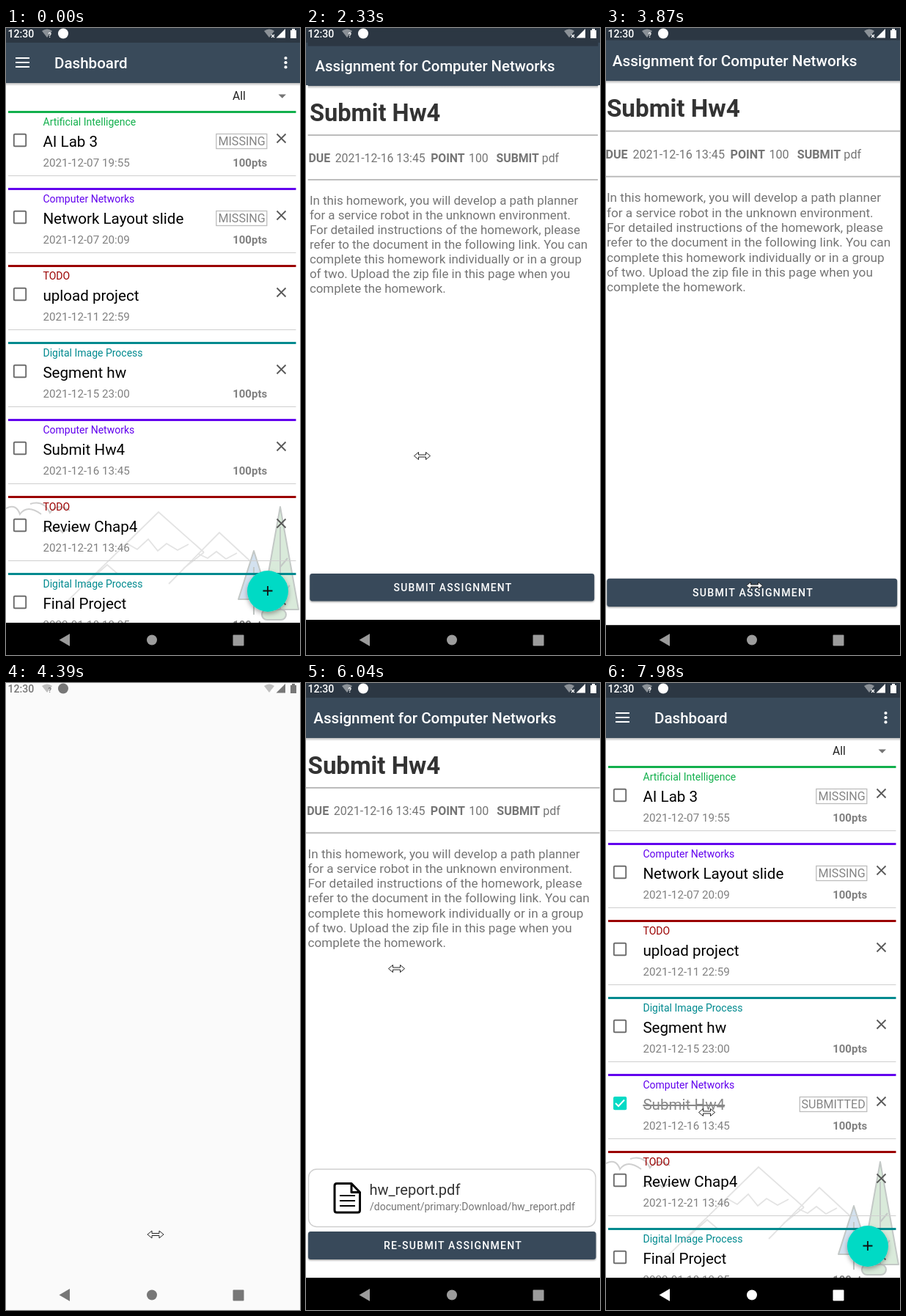
Write an HTML page that moves like this. It is 401x855 px and loops after 8 s.

```html
<!DOCTYPE html>
<html lang="en">
<head>
<meta charset="utf-8">
<title>Homework planner</title>
<style>
html, body { margin: 0; width: 100%; height: 100%; overflow: hidden; background: #000; }
svg { display: block; width: 401px; height: 855px; font-family: Roboto, sans-serif; }
text { white-space: pre; }
</style>
</head>
<body>
<svg id="stage" viewBox="0 0 401 855"></svg>
<script>
const LOOP = 8000, CX = 200, CY = 414;
const BAR = '#394a5a', GREY = '#757575', TEAL = '#03dac5';

const text = (x, y, s, size, fill, extra = '') =>
  `<text x="${x}" y="${y}" font-size="${size}" fill="${fill}" ${extra}>${s}</text>`;
const rect = (x, y, w, h, fill, extra = '') =>
  `<rect x="${x}" y="${y}" width="${w}" height="${h}" fill="${fill}" ${extra}/>`;
const line = (d, stroke, width, extra = '') =>
  `<path d="${d}" fill="none" stroke="${stroke}" stroke-width="${width}" ${extra}/>`;
const bold = 'font-weight="700"', medium = 'font-weight="500"';

const appBar = (x, title) =>
  rect(0, 74, 401, 737, '#fff') + rect(0, 75, 401, 4, 'url(#drop)') +
  rect(0, 10, 401, 65, BAR) + rect(0, 0, 401, 20, '#2c3743') +
  text(x, 55.3, title, 20.55, '#fff', medium);

// Dashboard
const subjects = {
  'Artificial Intelligence': '#12b04c',
  'Computer Networks': '#6200ee',
  'TODO': '#9b0000',
  'Digital Image Process': '#008a8f'
};
const [AI, NET, TODO, IMG] = Object.keys(subjects);
const tasks = [
  [AI, 'AI Lab 3', '2021-12-07 19:55', 1, 'MISSING'],
  [NET, 'Network Layout slide', '2021-12-07 20:09', 1, 'MISSING'],
  [TODO, 'upload project', '2021-12-11 22:59', 0],
  [IMG, 'Segment hw', '2021-12-15 23:00', 1],
  [NET, 'Submit Hw4', '2021-12-16 13:45', 1],
  [TODO, 'Review Chap4', '2021-12-21 13:46', 0],
  [IMG, 'Final Project', '2022-01-18 13:35', 1]
];

const badge = (s, w) =>
  rect(355.8 - w, 31.5, w, 20, 'none', 'stroke="#bdbdbd" stroke-width="1.3"') +
  text(353.8, 47.3, s, 16.1, '#858585', 'text-anchor="end"');

const openBox = rect(10.8, 31.8, 16.4, 16.4, 'none', 'rx="1.5" stroke="#707070" stroke-width="2"');
const checkedBox = rect(10, 31, 18.2, 18.2, TEAL, 'rx="2"') +
  line('M13 40l4 4 8-8.5', '#fff', 2);

function row([subject, title, due, points, status], i) {
  const color = subjects[subject];
  const plain = openBox + text(50.4, 49.3, title, 20.6, '#000');
  const head = i === 4
    ? `<g id="todo">${plain}</g><g id="done">${checkedBox}` +
      text(50.4, 49.3, title, 20.6, '#888', 'text-decoration="line-through"') + badge('SUBMITTED', 91.5) + '</g>'
    : plain;
  return `<g transform="translate(0 ${113 + i * 105})">` + rect(3, 0, 392.5, 3, color) +
    text(50.5, 20, subject, 14, color) + head + text(50.5, 75.5, due, 15.2, '#808080') +
    (points ? text(356.2, 75.5, '100pts', 15, '#808080', bold + ' text-anchor="end"') : '') +
    (status ? badge(status, 69) : '') +
    line('M369.5 31.5l12 12m0-12l-12 12', '#5a5a5a', 1.8) +
    rect(3, 88, 392.5, 1, '#cfcfcf') + '</g>';
}

const scenery =
  line('M0 655q14-7 19 8q10-14 29 0M33 649q18-6 27 12q10-14 27-3M50 687q20-10 27 1q10-8 22-3', '#cfcfcf', 2) +
  line('M75 790L208 660 270 715M222 758L291 688 345 738M165 703l14 8 15-14 13 16 12-10 15 9 15-8M262 717l13 6 12-9 13 10 15-8M102 764l36-32 14 12M270 715l-28 22',
    '#e3e3e3', 1.8) +
  '<g stroke="#c3c8c6" stroke-width="2" stroke-linejoin="round">' +
  '<path d="M349 793L374 653 399 793Z" fill="#d9eada"/><path d="M317 779L338 713 359 779Z" fill="#d3e1ef"/>' +
  '<path d="M374 680V806M374 735l10-12M374 760l-12-14M374 775l13-15M338 735V800M338 760l8-9" fill="none"/>' +
  '<rect x="349" y="793" width="33" height="14" rx="7" fill="#d9eada"/></g>';

const dashboard = '<g id="dash" clip-path="url(#page)">' + appBar(66, 'Dashboard') +
  line('M13 41h19M13 47h19M13 53h19', '#fff', 2) +
  [41, 47.2, 53.4].map(y => `<circle cx="381.5" cy="${y}" r="2.1" fill="#fff"/>`).join('') +
  text(309, 98, 'All', 15.6, '#222') + '<path d="M371.5 90.5h10.5l-5.2 5.2z" fill="#757575"/>' +
  scenery + tasks.map(row).join('') +
  `<circle cx="357" cy="768" r="28" fill="${TEAL}" filter="url(#lift)"/>` +
  line('M350.5 767.5h13M357 761v13', '#111', 1.8) + '</g>';

// Assignment
const body = [
  'In this homework, you will develop a path planner',
  'for a service robot in the unknown environment.',
  'For detailed instructions of the homework, please',
  'refer to the document in the following link. You can',
  'complete this homework individually or in a group',
  'of two. Upload the zip file in this page when you',
  'complete the homework.'
];
const facts = [
  [1.2, 'DUE', bold], [37.8, '2021-12-16 13:45'], [169.8, 'POINT', bold],
  [222.3, '100'], [260.3, 'SUBMIT', bold], [323.3, 'pdf']
];
const fileCard = '<g id="card">' +
  rect(3.5, 663, 391.5, 78.5, '#fff', 'rx="11" stroke="#cfcfcf" stroke-width="1.3"') +
  line('M42 682.5h20l11.5 12V719q0 3-3 3H42q-3 0-3-3V685.5q0-3 3-3zM62 682.5v12h11.5', '#000', 3, 'stroke-linejoin="round"') +
  line('M46 699h21M46 706h21M46 713h21', '#000', 2) +
  text(86.4, 698.4, 'hw_report.pdf', 20.1, '#333') +
  text(87, 718.8, '/document/primary:Download/hw_report.pdf', 14, GREY) + '</g>';

const assignment = '<g id="work" clip-path="url(#page)">' +
  appBar(10.3, 'Assignment for Computer Networks') +
  text(2.6, 123.8, 'Submit Hw4', 33, '#333', bold) +
  rect(0, 142, 400.5, 1.8, '#b5b5b5') + rect(0, 203.5, 400.5, 1.8, '#b5b5b5') +
  facts.map(([x, s, w]) => text(x, 180.3, s, 16, GREY, w)).join('') +
  body.map((s, i) => text(2.6, 238.7 + i * 20.2, s, 17.08, GREY)).join('') +
  fileCard + rect(2.9, 747.9, 392.6, 38, BAR, 'rx="3.5" filter="url(#low)"') +
  '<circle id="wave" cx="203" cy="760" fill="#fff" clip-path="url(#button)"/>' +
  text(200.5, 772, '', 14, '#fff', medium + ' id="label" text-anchor="middle" letter-spacing="1.28"') + '</g>';

const picker = `<g id="picker">${rect(0, 0, 401, 855, '#fafafa')}</g>`;

// System bars and pointer
const statusBar = '<g id="status" fill="#fff">' +
  text(2.5, 13, '12:30', 14.1, 'inherit', medium) +
  '<path d="M49 4q7-5 14 0l-7 9z" opacity=".45"/>' + text(57.5, 13, '?', 9, 'inherit', bold) +
  '<circle cx="78" cy="7.5" r="7"/>' +
  '<path d="M352 4q7-5 14 0l-7 9z" opacity=".45"/>' +
  '<path d="M362 9l4 4m0-4l-4 4" stroke="#fff" stroke-width="1.2"/>' +
  '<path d="M381 1v12.5H368.5zM388 3h2V1h4v2h2v11h-8z"/></g>';

const navBar = '<rect id="press" x="33" y="811" width="96" height="44" rx="22" fill="#fff"/>' +
  '<g id="nav"><path d="M87 826v17L72.5 834.5z"/><circle cx="199" cy="834.5" r="7"/>' +
  '<rect x="309.5" y="827.5" width="15" height="15" rx="1"/></g>';

const pointer = '<circle id="tap" cx="158" cy="582.5" r="12" fill="#888"/>' +
  '<path id="cursor" d="M-11 0l6-5v3.5h10V-5l6 5-6 5V1.5H-5V5z" fill="#fff" stroke="#222"/>';

document.getElementById('stage').innerHTML = `<defs>
  <linearGradient id="drop" x2="0" y2="1"><stop stop-color="#bbb"/><stop offset="1" stop-color="#fff"/></linearGradient>
  <clipPath id="page"><rect width="401" height="811"/></clipPath>
  <clipPath id="button"><rect x="3" y="748" width="392.5" height="38" rx="3.5"/></clipPath>
  <filter id="lift" x="-30%" y="-30%" width="160%" height="170%"><feDropShadow dx="0" dy="3" stdDeviation="3" flood-opacity=".35"/></filter>
  <filter id="low" x="-3%" y="-20%" width="106%" height="150%"><feDropShadow dx="0" dy="1.2" stdDeviation="1.1" flood-opacity=".4"/></filter>
</defs>` + rect(0, 78, 401, 729, '#fff') + rect(0, 0, 401, 78, BAR) + rect(0, 0, 401, 20, '#2c3743') +
  dashboard + assignment + picker + statusBar + navBar + pointer;

const el = {};
for (const id of ['dash', 'work', 'picker', 'todo', 'done', 'card', 'wave', 'label', 'status', 'press', 'nav', 'tap', 'cursor'])
  el[id] = document.getElementById(id);

// Motion
const clamp = v => Math.min(1, Math.max(0, v));
const ramp = (t, a, b) => clamp((t - a) / (b - a));
const show = (node, on) => node.setAttribute('display', on ? 'inline' : 'none');
const fade = (node, alpha) => node.setAttribute('opacity', alpha);
const bezier = (u, a, b, c, d) => {
  const v = 1 - u;
  return v * v * v * a + 3 * v * v * u * b + 3 * v * u * u * c + u * u * u * d;
};

// Quick start, very slow finish: two joined Bezier curves
function ease(x) {
  if (x <= 0) return 0;
  if (x >= 1) return 1;
  const [xs, ys] = x < 1 / 6
    ? [[0, .05, .13333, .16667], [0, 0, .06, .4]]
    : [[.16667, .20833, .25, 1], [.4, .82, 1, 1]];
  let lo = 0, hi = 1;
  for (let i = 0; i < 24; i++) {
    const mid = (lo + hi) / 2;
    if (bezier(mid, ...xs) < x) lo = mid; else hi = mid;
  }
  return bezier(lo, ...ys);
}

function place(node, scale, alpha = 1) {
  show(node, alpha > 0);
  fade(node, alpha);
  node.setAttribute('transform', `translate(${CX} ${CY}) scale(${scale}) translate(${-CX} ${-CY})`);
}

// ms is the time since the screen change began
function enter(above, below, ms) {
  const p = ease(ms / 400), alpha = ramp(ms, 53, 133);
  place(above, .85 + .15 * p, alpha);
  place(below, 1 + .05 * p, alpha < 1 ? 1 : 0);
}
function leave(above, below, ms) {
  const p = ease(ms / 400);
  place(above, 1 - .1 * p, 1 - ramp(ms, 20, 60));
  place(below, 1.05 - .05 * p);
}

function screens(t) {
  for (const s of [el.dash, el.work, el.picker]) place(s, 1, 0);
  if (t < 2090) place(el.dash, 1);
  else if (t < 2370) enter(el.work, el.dash, t < 2330 ? Math.min(t - 2077, 93) : 168);
  else if (t < 3870) place(el.work, 1);
  else if (t < 4220) enter(el.picker, el.work, t - 3820);
  else if (t < 5197) place(el.picker, 1);
  else if (t < 5597) leave(el.picker, el.work, t - 5197);
  else if (t < 7580) place(el.work, 1);
  else leave(el.work, el.dash, t - 7580);
}

const path = [
  [360, 381.5, 799], [440, 261.5, 640.5], [680, 261.5, 640.5], [1000, 113.5, 604],
  [1260, 158.5, 583.5], [2780, 158.5, 583.5], [2930, 202.5, 760.5], [3900, 202.5, 760.5],
  [4140, 204, 752], [4390, 204, 752], [4940, 123.5, 388.5], [5300, 123.5, 388.5],
  [5550, 123.5, 389.5], [6040, 123.5, 389.5], [6320, 234.5, 657.5], [6760, 234.5, 657.5],
  [7350, 87.5, 839.5], [7600, 87.5, 839.5], [7960, 137.5, 585.5], [LOOP, 137.5, 585.5]
];

function moveCursor(t) {
  show(el.cursor, t >= 360);
  const i = path.findIndex(k => k[0] > t);
  if (i < 1) return;
  const [a, x, y] = path[i - 1], [b, x2, y2] = path[i];
  const k = ramp(t, a, b), s = k * k * (3 - 2 * k);
  el.cursor.setAttribute('transform', `translate(${x + (x2 - x) * s} ${y + (y2 - y) * s})`);
}

function draw(t) {
  const sent = t >= 4200;
  screens(t);
  moveCursor(t);
  show(el.todo, !sent);
  show(el.done, sent);
  show(el.card, sent);
  el.label.textContent = (sent ? 'RE-SUBMIT' : 'SUBMIT') + ' ASSIGNMENT';

  fade(el.tap, t >= 1710 && t < 1840 ? .35 * (1 - ramp(t, 1750, 1860)) : 0);
  el.wave.setAttribute('r', 20 + 200 * ramp(t, 3180, 3400));
  fade(el.wave, t >= 3180 ? .24 * (1 - ramp(t, 3330, 3490)) : 0);
  fade(el.press, .13 * ramp(t, 7390, 7490) * (1 - ramp(t, 7600, 7850)));

  const light = t > 3930 && t < 5230;
  el.status.setAttribute('fill', light ? '#777' : '#fff');
  el.nav.setAttribute('fill', t >= 7550 ? '#fff' : light ? '#777' : '#9c9c9c');
}

function tick() {
  draw(performance.now() % LOOP);
  requestAnimationFrame(tick);
}
tick();
</script>
</body>
</html>
```
